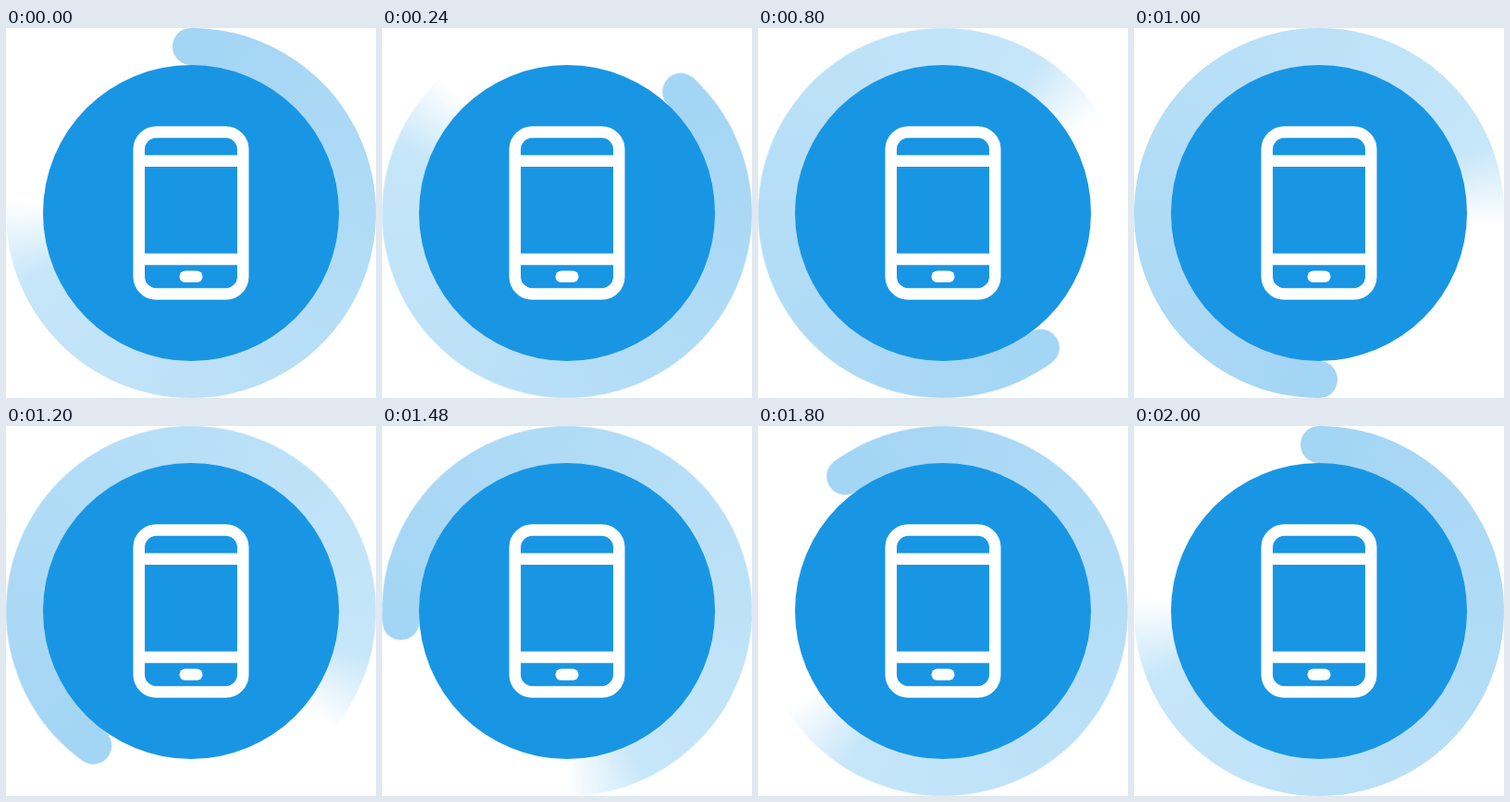
Write an HTML page without scripts that moves like this. It is 400 px wide and 400 px high and loops after 2.04 s.

```html
<!DOCTYPE html>
<html lang="en">
<head>
<meta charset="utf-8">
<title>Phone loader</title>
<style>
  :root { --blue: #1996e3; --head: #a3d5f4; --tail: #c6e6f9; }
  html, body { margin: 0; width: 100%; height: 100%; overflow: hidden; background: #fff; }
  .stage { position: relative; width: 400px; height: 400px; overflow: hidden; }

  /* 51 poses of 40 ms, the last equal to the first */
  .ring {
    position: absolute; inset: 0; border-radius: 50%;
    background: conic-gradient(var(--head), var(--tail) 248deg, #fff 274deg);
    animation: spin 2040ms steps(51, jump-none) infinite;
  }
  .ring::before {
    content: ""; position: absolute; left: 180px; top: 0;
    width: 40px; height: 40px; border-radius: 50%; background: var(--head);
  }
  @keyframes spin { from { transform: rotate(0deg); } to { transform: rotate(360deg); } }

  svg { position: absolute; inset: 0; display: block; }
</style>
</head>
<body>
<div class="stage">
  <div class="ring"></div>
  <svg width="400" height="400" viewBox="0 0 400 400">
    <circle cx="200" cy="200" r="160" fill="#1996e3"/>
    <g fill="none" stroke="#fff" stroke-width="12.5">
      <rect x="143.75" y="112.5" width="112.5" height="175" rx="18.75"/>
      <path d="M144 143.75H256M144 250H256"/>
      <path d="M193.75 268.75H206.25" stroke-linecap="round"/>
    </g>
  </svg>
</div>
</body>
</html>
```
